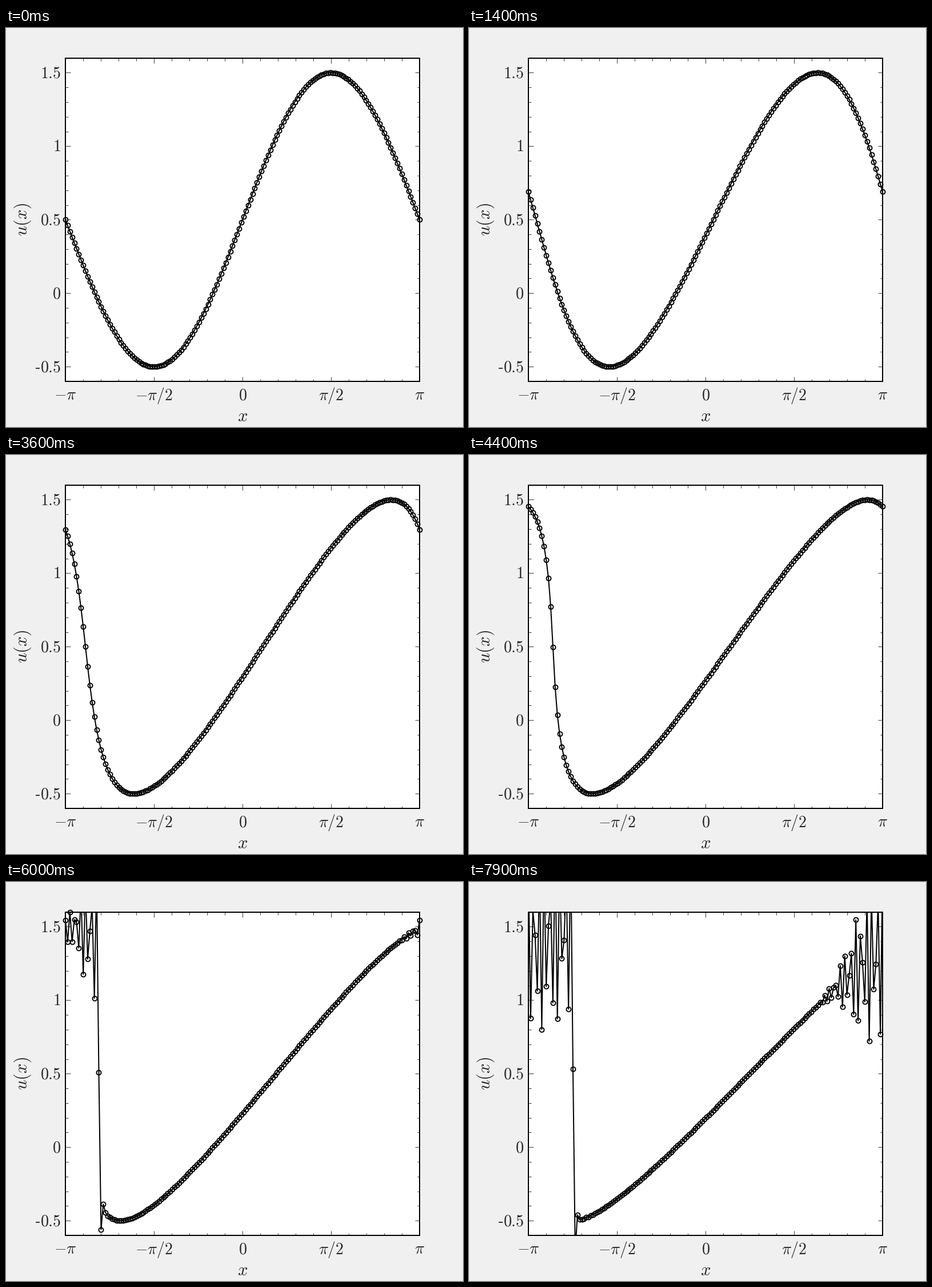
Write a matplotlib script that moves like this. It is 800 by 700 pixels and loops after 8000 ms.

```python
import numpy as np
import matplotlib.pyplot as plt
from matplotlib.animation import FuncAnimation
from matplotlib.lines import Line2D
from matplotlib.ticker import MultipleLocator

W, H, DPI = 800, 700, 100
LEFT, RIGHT, TOP, BOTTOM = 104, 724, 52.6, 620
YMIN, YMAX = -0.6, 1.6
N, FRAMES = 160, 80
INK = "#262626"

plt.rcParams["mathtext.fontset"] = "cm"


def pt(px):
    return px * 72 / DPI


# Inviscid Burgers equation, sixth-order central flux differences, RK4 in time
x = np.linspace(-np.pi, np.pi, N)
dx = x[1] - x[0]
dt = 0.5 * dx


def rhs(u):
    f = u * u / 2
    d1, d2, d3 = (np.roll(f, -k) - np.roll(f, k) for k in (1, 2, 3))
    return -(45 * d1 - 9 * d2 + d3) / (60 * dx)


def step(u):
    k1 = rhs(u)
    k2 = rhs(u + dt / 2 * k1)
    k3 = rhs(u + dt / 2 * k2)
    k4 = rhs(u + dt * k3)
    return u + dt / 6 * (k1 + 2 * k2 + 2 * k3 + k4)


def solve():
    u = 0.5 + np.sin(x[:-1])  # the last node repeats the first
    states = []
    for _ in range(FRAMES):
        states.append(np.append(u, u[0]))
        u = step(u)
    return states


states = solve()

fig = plt.figure(figsize=(W / DPI, H / DPI), dpi=DPI, facecolor="#f0f0f0")
ax = fig.add_axes([LEFT / W, 1 - BOTTOM / H,
                   (RIGHT - LEFT) / W, (BOTTOM - TOP) / H])
ax.set_xlim(-np.pi, np.pi)
ax.set_ylim(YMIN, YMAX)
ax.xaxis.set_major_locator(MultipleLocator(np.pi / 2))
ax.xaxis.set_minor_locator(MultipleLocator(np.pi / 10))
ax.yaxis.set_major_locator(MultipleLocator(0.5))
ax.yaxis.set_minor_locator(MultipleLocator(0.1))
for which, size in (("major", 8.5), ("minor", 4.5)):
    ax.tick_params(which=which, direction="in", length=pt(size), width=pt(0.9),
                   color=INK, top=True, right=True,
                   labelleft=False, labelbottom=False)
for spine in ax.spines.values():
    spine.set_linewidth(pt(2))


def label(px, py, text, size=28, **kw):
    fig.text(px / W, 1 - py / H, text, fontsize=pt(size), color=INK,
             va="baseline", **kw)


for i, name in enumerate((r"-\pi", r"-\pi/2", "0", r"\pi/2", r"\pi")):
    label(LEFT + i * (RIGHT - LEFT) / 4, 652.5, f"${name}$", ha="center")

for value in (-0.5, 0, 0.5, 1, 1.5):
    py = BOTTOM - (value - YMIN) / (YMAX - YMIN) * (BOTTOM - TOP)
    label(96, py + 9, f"${abs(value):g}$", ha="right")
    if value < 0:  # short hyphen as the sign
        fig.add_artist(Line2D([51.5 / W, 59 / W], [1 - (py + 2.5) / H] * 2,
                              lw=pt(1.8), color=INK, solid_capstyle="butt"))

label(414, 690, "$x$", 30.8, ha="center")
label(36.5, 336, "$u(x)$", 30.8, ha="center", rotation=90,
      rotation_mode="anchor")

curve, = ax.plot([], [], color="k", lw=pt(2), solid_joinstyle="round")
dots, = ax.plot([], [], "o", ms=pt(8), mfc="none", mec="k", mew=pt(1.9),
                clip_on=False)


def draw(i):
    u = states[i]
    curve.set_data(x, u)
    inside = (u >= YMIN) & (u <= YMAX)
    dots.set_data(x[inside], u[inside])
    return curve, dots


anim = FuncAnimation(fig, draw, frames=FRAMES, interval=100,
                     repeat=True, repeat_delay=0)
plt.show()
```
